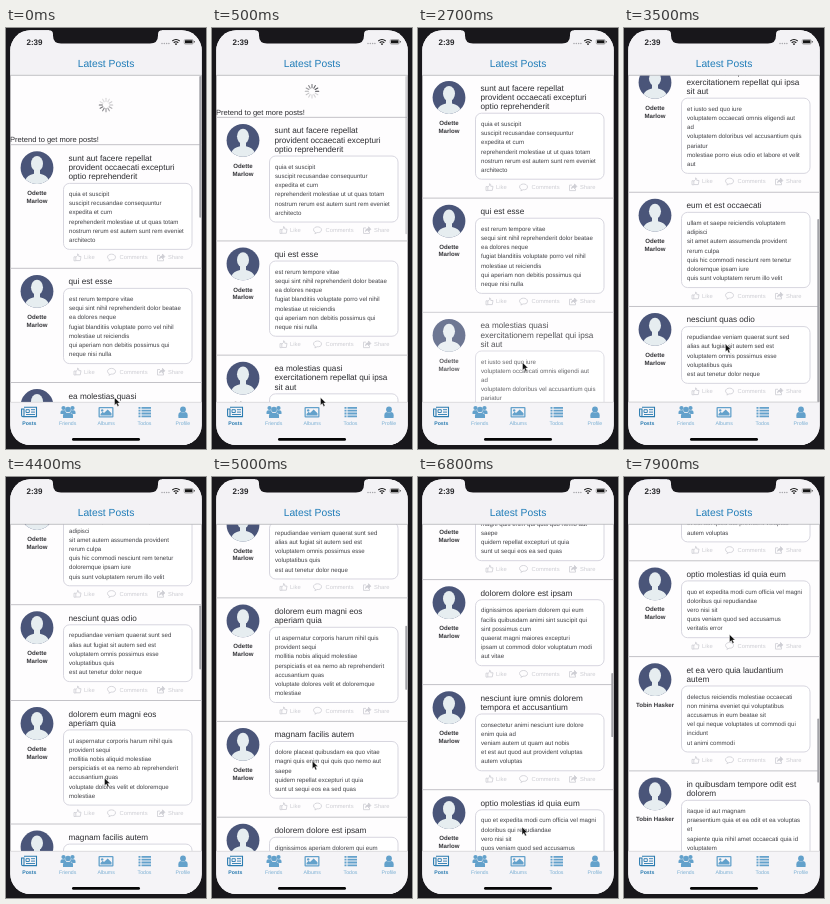
These frames come from a looping animation (200 px wide and 421 px high, 8000 ms). An HTML page:

```html
<!DOCTYPE html>
<html lang="en">
<head>
<meta charset="utf-8">
<title>Latest Posts</title>
<style>
html, body { margin: 0; width: 100%; height: 100%; overflow: hidden; background: #18171b; }
svg { display: block; width: 200px; height: 421px; }
text { font-family: "Liberation Sans", Arial, sans-serif; text-rendering: geometricPrecision; white-space: pre; }
.title { font-size: 8.2px; fill: #2c2c30; }
.body { font-size: 6.1px; fill: #414146; }
.name { font-size: 6.1px; font-weight: bold; fill: #333337; text-anchor: middle; }
.act { font-size: 5.8px; fill: #cdcdd3; }
.tab { font-size: 5.2px; text-anchor: middle; }
</style>
</head>
<body>
<svg id="stage" viewBox="0 0 200 421" xmlns="http://www.w3.org/2000/svg">
  <defs>
    <clipPath id="face"><circle cx="31" cy="23" r="16.4"/></clipPath>
    <clipPath id="screen"><rect x="4.300" y="2.300" width="191.400" height="414.700" rx="20"/></clipPath>
    <g id="avatar">
      <circle cx="31" cy="23" r="16.400" fill="#4a5579"/>
      <g clip-path="url(#face)" fill="#e6edf0">
        <ellipse cx="31" cy="19" rx="6" ry="7.600"/>
        <path d="M28 24h6v5q7 1.500 8.500 6v6h-23v-6q1.500 -4.500 8.500 -6z"/>
      </g>
    </g>
    <g id="actions" fill="none" stroke="#cdcdd3" stroke-width=".8" stroke-linejoin="round">
      <path d="M68 -.5h1.800v4h-1.800zM69.800 0l1.700 -1.600v-1.800q1.600 0 1.300 2.600h2.200l-.7 4.100h-4.500"/>
      <path d="M103.500 2.500q-2 -1 -2 -2.600c0 -4 8 -4 8 0c0 2.500 -2.500 2.900 -4.400 2.700l-2.200 1.200z"/>
      <path d="M154 -2h-2.500v5.500h6v-2"/>
      <path d="M153.500 1.500q.2 -3 3 -3v-1.700l2.300 2.500l-2.300 2.400v-1.600q-2 0 -3 1.400z" fill="#cdcdd3"/>
    </g>
  </defs>
  <g clip-path="url(#screen)">
    <rect width="200" height="421" fill="#fefdfe"/>
    <g id="list"></g>
    <g id="refresh">
      <g id="spinner"></g>
      <text id="hint" x="4" font-size="7.55" fill="#2c2c30">Pretend to get more posts!</text>
    </g>
    <rect id="bar" x="193.300" width="1.800" rx=".9" fill="#a3a3a8"/>

    <rect width="200" height="47" fill="#f3f2f5"/>
    <path d="M4 47.300h192" stroke="#bcbbc0" stroke-width=".9"/>
    <text x="100" y="38.900" font-size="10.300" fill="#207db8" text-anchor="middle">Latest Posts</text>
    <text x="20.500" y="16.900" font-size="8" font-weight="bold" fill="#2a2a2d">2:39</text>
    <g fill="#a5a5aa"><circle cx="156" cy="15.500" r=".75"/><circle cx="158.300" cy="15.500" r=".75"/><circle cx="160.600" cy="15.500" r=".75"/><circle cx="162.900" cy="15.500" r=".75"/></g>
    <g fill="none" stroke="#151515" stroke-width="1.100">
      <path d="M166.300 13q3.700 -3 7.400 0M167.700 14.700q2.300 -1.800 4.600 0"/>
      <rect x="178.200" y="11.500" width="9" height="4.600" rx="1.300" stroke="#777" stroke-width=".6"/>
    </g>
    <circle cx="170" cy="16.100" r=".9" fill="#151515"/>
    <path d="M179 12.300h7.400v3h-7.400zM187.900 13.100h.7v1.500h-.7z" fill="#151515"/>

    <rect y="374" width="200" height="47" fill="#f5f4f7"/>
    <path d="M4 374.300h192" stroke="#c9c8cd" stroke-width=".6"/>
    <g fill="none" stroke="#2a7bb0" stroke-width="1.100">
      <path d="M18 379.300h12.500v9.300h-13.500q-1.400 0 -1.400 -1.400v-6.200h2.400v6.200q0 1.400 -1 1.400"/>
      <path d="M20 381.700h3.300v2.800h-3.300zM25 381.700h4M25 384.100h4M20 386.500h9" stroke-width=".9"/>
    </g>
    <g fill="#63a1cb">
      <circle cx="57.500" cy="380" r="2.100"/><circle cx="66.500" cy="380" r="2.100"/><circle cx="62" cy="381.500" r="2.800"/>
      <path d="M54.500 386v-2q0 -1.800 2 -1.800h2.500l1 2.500l-2.500 1.300zM69.500 386v-2q0 -1.800 -2 -1.800h-2.500l-1 2.500l2.500 1.300zM57 390q-.7 -5.500 3 -5.500q2 1 4 0q3.700 0 3 5.500z"/>
      <path d="M93.500 379h13q1 0 1 1v8.500q0 1 -1 1h-13q-1 0 -1 -1v-8.500q0 -1 1 -1zM93.800 380.200v8h12.400v-8z" fill-rule="evenodd"/>
      <circle cx="96.200" cy="382.400" r="1.200"/>
      <path d="M94.500 387.500v-1.500l2.200 -2.200l1.300 1.300l3.700 -3.600l3.800 3.700v2.300z"/>
      <path d="M132.500 379h2v1.800h-2zM135.500 379h9.500v1.800h-9.500zM132.500 381.800h2v1.800h-2zM135.500 381.800h9.500v1.800h-9.500zM132.500 384.600h2v1.800h-2zM135.500 384.600h9.500v1.800h-9.500zM132.500 387.400h2v1.800h-2zM135.500 387.400h9.500v1.800h-9.500z"/>
      <circle cx="177" cy="381.500" r="2.900"/>
      <path d="M172.500 390q-1 -6 2.500 -6q2 1.200 4 0q3.500 0 2.500 6z"/>
    </g>
    <g id="tabs"></g>
    <rect x="66" y="410" width="68" height="2.800" rx="1.400" fill="#050505"/>
  </g>
  <path d="M43 0v2.300q4 0 4 4v1.200q0 8 8 8h89q8 0 8 -8v-1.200q0 -4 4 -4v-2.300z" fill="#18171b"/>
  <path id="cursor" d="M0 0v7.700l1.800 -1.600l1.300 2.800l1.400 -.7l-1.300 -2.700h2.400z" fill="#111" stroke="#fff" stroke-width=".4"/>
</svg>
<script>
const LOOP = 8000, TOP = 47, VIEW = 327;
const $ = id => document.getElementById(id);

function add(parent, tag, attrs, label) {
  const el = document.createElementNS('http://www.w3.org/2000/svg', tag);
  for (const k in attrs) el.setAttribute(k, attrs[k]);
  if (label) el.textContent = label;
  parent.appendChild(el);
  return el;
}

// title | body, with "/" between lines
const posts = [
  'sunt aut facere repellat/provident occaecati excepturi/optio reprehenderit|quia et suscipit/suscipit recusandae consequuntur/expedita et cum/reprehenderit molestiae ut ut quas totam/nostrum rerum est autem sunt rem eveniet/architecto',
  'qui est esse|est rerum tempore vitae/sequi sint nihil reprehenderit dolor beatae/ea dolores neque/fugiat blanditiis voluptate porro vel nihil/molestiae ut reiciendis/qui aperiam non debitis possimus qui/neque nisi nulla',
  'ea molestias quasi/exercitationem repellat qui ipsa/sit aut|et iusto sed quo iure/voluptatem occaecati omnis eligendi aut/ad/voluptatem doloribus vel accusantium quis/pariatur/molestiae porro eius odio et labore et velit/aut',
  'eum et est occaecati|ullam et saepe reiciendis voluptatem/adipisci/sit amet autem assumenda provident/rerum culpa/quis hic commodi nesciunt rem tenetur/doloremque ipsam iure/quis sunt voluptatem rerum illo velit',
  'nesciunt quas odio|repudiandae veniam quaerat sunt sed/alias aut fugiat sit autem sed est/voluptatem omnis possimus esse/voluptatibus quis/est aut tenetur dolor neque',
  'dolorem eum magni eos/aperiam quia|ut aspernatur corporis harum nihil quis/provident sequi/mollitia nobis aliquid molestiae/perspiciatis et ea nemo ab reprehenderit/accusantium quas/voluptate dolores velit et doloremque/molestiae',
  'magnam facilis autem|dolore placeat quibusdam ea quo vitae/magni quis enim qui quis quo nemo aut/saepe/quidem repellat excepturi ut quia/sunt ut sequi eos ea sed quas',
  'dolorem dolore est ipsam|dignissimos aperiam dolorem qui eum/facilis quibusdam animi sint suscipit qui/sint possimus cum/quaerat magni maiores excepturi/ipsam ut commodi dolor voluptatum modi/aut vitae',
  'nesciunt iure omnis dolorem/tempora et accusantium|consectetur animi nesciunt iure dolore/enim quia ad/veniam autem ut quam aut nobis/et est aut quod aut provident voluptas/autem voluptas',
  'optio molestias id quia eum|quo et expedita modi cum officia vel magni/doloribus qui repudiandae/vero nisi sit/quos veniam quod sed accusamus/veritatis error',
  'et ea vero quia laudantium/autem|delectus reiciendis molestiae occaecati/non minima eveniet qui voluptatibus/accusamus in eum beatae sit/vel qui neque voluptates ut commodi qui/incidunt/ut animi commodi',
  'in quibusdam tempore odit est/dolorem|itaque id aut magnam/praesentium quia et ea odit et ea voluptas/et/sapiente quia nihil amet occaecati quia id/voluptatem/incidunt ea est distinctio odio'
];

let nextTop = TOP + .7;
const cards = posts.map((post, i) => {
  const [title, body] = post.split('|').map(s => s.split('/'));
  const author = i < 10 ? ['Odette', 'Marlow'] : ['Tobin Hasker'];
  const card = add($('list'), 'g', { transform: `translate(0 ${nextTop})` });
  const boxTop = 20.6 + 9.3 * (title.length - 1);
  const boxHeight = 9.2 * body.length + 10.8;
  const actY = boxTop + boxHeight + 7.4;
  const lines = (rows, cls, x, y, step) =>
    rows.forEach((row, n) => add(card, 'text', { class: cls, x, y: y + n * step }, row));

  add(card, 'path', { d: 'M4 0h192', stroke: '#c3c2c7', 'stroke-width': 1 });
  add(card, 'use', { href: '#avatar' });
  lines(author, 'name', 31, 50.6, 7.7);
  lines(title, 'title', 62.5, 16, 9.3);
  add(card, 'rect', { x: 57.5, y: boxTop - .5, width: 128.5, height: boxHeight, rx: 6, fill: '#fff', stroke: '#d3d2dc', 'stroke-width': .9 });
  lines(body, 'body', 63, boxTop + 12.2, 9.2);
  add(card, 'use', { href: '#actions', y: actY });
  [['Like', 78], ['Comments', 113.5], ['Share', 162]].forEach(([label, x]) =>
    add(card, 'text', { class: 'act', x, y: actY + 2.2 }, label));
  nextTop += actY + 11;
  return card;
});

['Posts', 'Friends', 'Albums', 'Todos', 'Profile'].forEach((label, i) =>
  add($('tabs'), 'text', {
    class: 'tab', x: 23.3 + i * 38.4, y: 397.4,
    fill: i ? '#7aafd3' : '#2a7bb0', 'font-weight': i ? 'normal' : 'bold'
  }, label));

const spokes = Array.from({ length: 12 }, (_, i) =>
  add($('spinner'), 'path', { d: 'M0 -3.600V-6.700', stroke: '#44444a', 'stroke-width': 1.1, 'stroke-linecap': 'round', transform: `rotate(${i * 30})` }));

// [time, value, ...]; each step is eased from the one before
const scrollSteps = [[0, -69], [200, -69], [650, -40], [2050, -40], [2450, 0], [2700, 0],
  [3250, 253.6], [3500, 253.6], [4400, 404.8], [4500, 404.8], [5250, 513.6], [5600, 513.6],
  [6500, 745], [6900, 745], [7900, 973.9]];
const cursorSteps = [[0, 108.5, 369.5], [2050, 108.5, 369.5], [2500, 104.5, 334.5], [2700, 104.5, 334.5], [2950, 103, 240],
  [3400, 101.5, 316], [3500, 101.5, 316], [3800, 100, 220], [4300, 98.5, 301], [4400, 98.5, 301],
  [4700, 99, 230], [5400, 102.5, 366.5], [5600, 102.5, 366.5], [6050, 104, 190], [6700, 104, 350],
  [6900, 104, 350], [7500, 105.5, 157.5]];
const barSteps = [[0, 1], [350, 1], [650, 0], [2720, 0], [2800, 1]];

const smooth = p => p * p * (3 - 2 * p);
const glide = p => 1 - (1 - p) ** 2.6;

function sample(steps, t, ease) {
  const n = steps.findIndex(s => s[0] > t);
  if (n < 0) return steps[steps.length - 1].slice(1);
  const a = steps[n - 1], b = steps[n];
  const p = ease((t - a[0]) / (b[0] - a[0]));
  return a.slice(1).map((v, i) => v + (b[i + 1] - v) * p);
}

function draw(t) {
  const [scroll] = sample(scrollSteps, t, glide);
  const [x, y] = sample(cursorSteps, t, smooth);
  const pull = Math.max(0, -scroll);

  $('list').setAttribute('transform', `translate(0 ${-scroll})`);
  $('cursor').setAttribute('transform', `translate(${x} ${y})`);
  cards[2].setAttribute('opacity', t >= 2600 && t < 2800 ? .8 : 1);

  $('refresh').setAttribute('opacity', Math.min(1, pull / 30));
  $('hint').setAttribute('y', TOP + pull - 2);
  $('spinner').setAttribute('transform', `translate(100 ${TOP + (pull - 9) / 2})`);
  const head = Math.floor(t / 1000 * 12) + 9;
  const strength = t < 200 ? .8 : 1;
  spokes.forEach((s, i) =>
    s.setAttribute('opacity', strength * (.22 + .78 * Math.max(0, 1 - ((head - i) % 12 + 12) % 12 / 8))));

  const total = t < 3550 ? 580.6 : 1645;
  $('bar').setAttribute('y', TOP + 1 + Math.max(0, scroll) * VIEW / total);
  $('bar').setAttribute('height', VIEW * VIEW / total - pull * .6 - 1);
  $('bar').setAttribute('opacity', sample(barSteps, t, smooth)[0]);
}

const start = performance.now();
function tick() {
  draw((performance.now() - start) % LOOP);
  requestAnimationFrame(tick);
}
tick();
</script>
</body>
</html>
```
